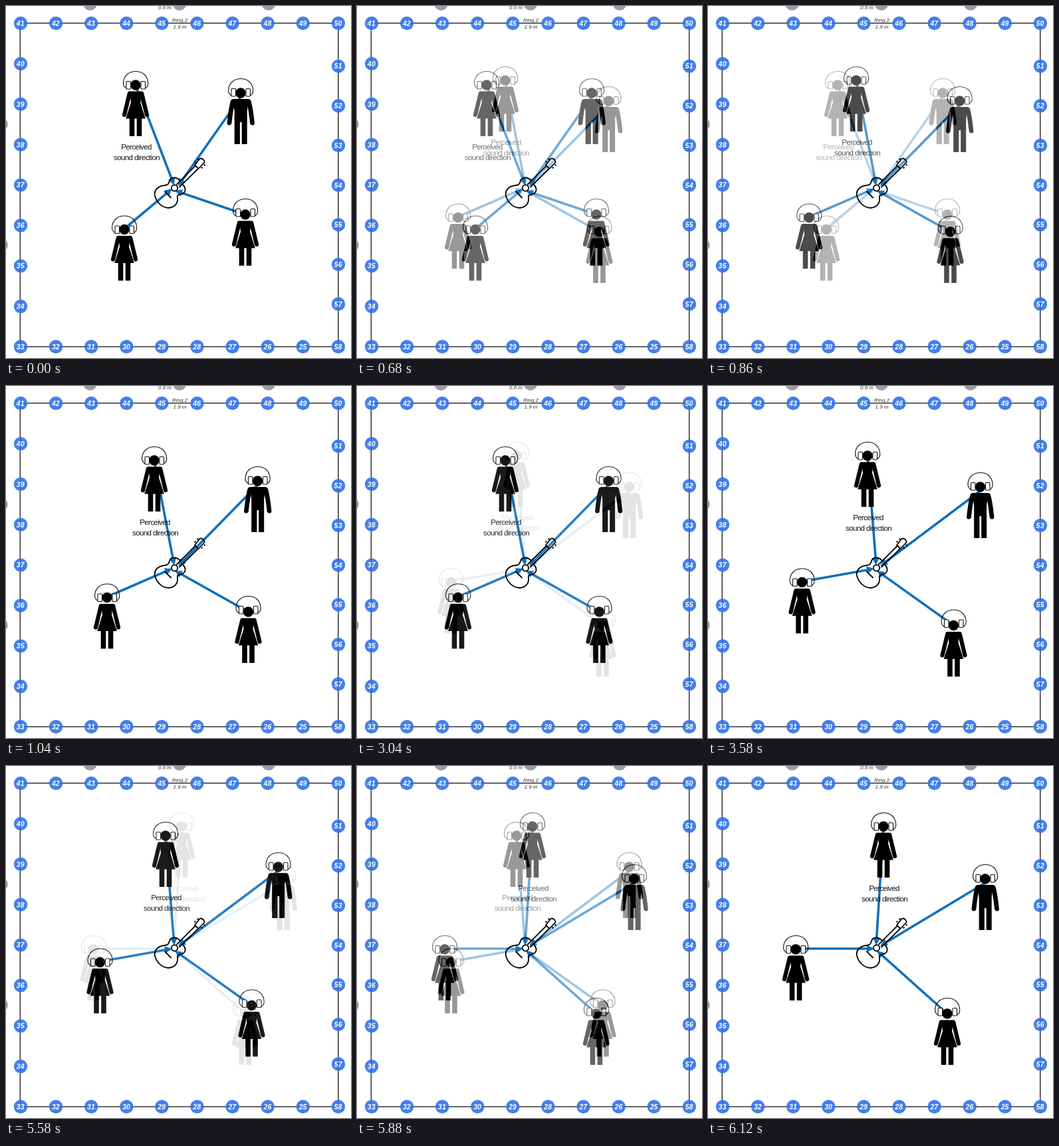
Animation, 519 px wide and 530 px high, one loop 8 s. Source, as an HTML page:

```html
<!DOCTYPE html>
<html lang="en">
<head>
<meta charset="utf-8">
<title>Perceived sound direction</title>
<style>
  html, body { margin: 0; width: 100%; height: 100%; overflow: hidden; background: #fff; }
  svg { display: block; width: 519px; height: 530px; }
  text { font-family: "Liberation Sans", Arial, sans-serif; text-anchor: middle; }
  .caption { font-size: 11.5px; letter-spacing: -.6px; fill: #111; }
  .number { font-size: 10.5px; font-style: italic; font-weight: bold; fill: #fff; }
  .ring { font-size: 8px; font-style: italic; fill: #333; }
  .arrow { stroke: #1070bc; stroke-width: 3.6; }
  .head { fill: #1070bc; }
  .guitar { fill: none; stroke: #000; stroke-width: 1.8; stroke-linejoin: round; stroke-linecap: round; }
</style>
</head>
<body>
<svg viewBox="0 0 519 530">
  <defs>
    <g id="phones" fill="none" stroke="#111" stroke-width="1.1">
      <path d="M-14 5Q-18.500 2-18.500-3C-18-15-9-20.500 .3-20.500S18-15 18.700-3Q19 2 14.500 5"/>
      <rect x="-14" y="-5.500" width="6.500" height="11.500" rx="1" fill="#fff"/>
      <rect x="8" y="-5.500" width="6.500" height="11.500" rx="1" fill="#fff"/>
    </g>
    <g id="woman">
      <circle r="7.700"/>
      <path d="M-9 9.500H9L7 26L14.800 50.500H-14.800L-7 26Z"/>
      <path d="M-9.200 12.700L-17 45M9.200 12.700L17 45" stroke="#000" stroke-width="6.200" stroke-linecap="round"/>
      <path d="M-9.300 50h7.600v27h-7.600zM1.700 50h7.600v27h-7.600z"/>
    </g>
    <g id="man">
      <circle r="7.700"/>
      <path d="M-12 9H12.500L9.700 27V77H1.700V44H-1.100V77H-9.300V27Z"/>
      <path d="M-11.700 12.700Q-14.500 22-17 45M12.200 12.700Q15 22 17.500 45" fill="none" stroke="#000" stroke-width="6.800" stroke-linecap="round"/>
    </g>
  </defs>
  <g id="scenes"></g>
  <g class="guitar">
    <path d="M262 263C258 258 252 257 248 260C244 264 247 269 239 270C229 271 222 277 224 286C227 297 236 304 245 304C254 303 259 297 258 289C257 284 260 284 265 283C271 280 271 274 266 269"/>
    <circle cx="253.500" cy="274" r="4.600" fill="#fff"/>
    <path d="M239 279.500L248 288.500M257 268.500L285 240.500M261 272.500L289.500 244.500M284 239.500L291.500 230Q294 228.500 297 231.500Q299.500 234.500 298 236L289.500 245Z"/>
    <path d="M284.500 234.500h.1M288.500 230.500h.1M294.500 243.500h.1M298.500 239.500h.1" stroke-width="2.400"/>
  </g>
  <g id="room"></g>
</svg>
<script>
// tail: where the arrow leaves, below the head centre; lift: how high the headphones sit.
const LISTENERS = [
  { shape: "woman", tail: 0, lift: 0, tip: [253, 270], spots: [[195, 119], [223, 112], [240, 105], [264, 91]] },
  { shape: "man",   tail: 6, lift: 1, tip: [259, 271], spots: [[353, 131], [378.5, 143], [409.5, 152], [417, 170]] },
  { shape: "woman", tail: -1, lift: 0, tip: [250, 275], spots: [[178, 336.5], [152, 318.5], [141.5, 295.5], [132, 276]] },
  { shape: "woman", tail: 0, lift: 3, tip: [254, 278], spots: [[360, 314], [364.5, 340], [369.5, 360.5], [360, 373]] }
];
const LOOP = 8000, FIRST_FADE = 500, FADE_GAP = 2540, STEP = 60, STEPS = 10;
const BLUE = "#3072e8", GREY = "#8e9299";

const label = (cls, x, y, str) => `<text class="${cls}" x="${x}" y="${y}">${str}</text>`;
const disc = (x, y, fill) => `<circle cx="${x}" cy="${y}" r="10.2" fill="${fill}" fill-opacity=".9"/>`;
const marker = (x, y, n) => disc(x, y, BLUE) + label("number", x - .3, y + 3.8, n);
const place = (id, x, y) => `<use href="#${id}" x="${x}" y="${y}"/>`;

function arrow(x, y, [tx, ty]) {
  const length = Math.hypot(tx - x, ty - y);
  const angle = Math.atan2(ty - y, tx - x) * 180 / Math.PI;
  return `<g transform="translate(${x} ${y}) rotate(${angle})">
    <path class="arrow" d="M0 0H${length - 8}"/>
    <path class="head" d="M${length} 0l-11-5.500v11z"/></g>`;
}

function scene(i) {
  let arrows = "", people = "";
  for (const { shape, tail, lift, tip, spots } of LISTENERS) {
    const [x, y] = spots[i];
    arrows += arrow(x, y + tail, tip);
    people += place(shape, x, y) + place("phones", x, y - lift);
  }
  const [cx, cy] = LISTENERS[0].spots[i];
  return `<g><rect width="519" height="530" fill="#fff"/>${arrows}${people}` +
    label("caption", cx + 1, cy + 97, "Perceived") +
    label("caption", cx + 1.5, cy + 113, "sound direction") + "</g>";
}

function room() {
  let out = '<path d="M21.3 25.800H499.800V513H21.300Z" fill="none" stroke="#333" stroke-width="1.5"/>';
  for (const x of [126.5, 261, 395]) out += disc(x, -3.5, GREY);
  for (const y of [178, 360]) out += disc(-7.5, y, GREY);
  for (let i = 0; i < 10; i++) {
    const x = 22 + i * 53.1;
    out += marker(x, 26, 41 + i) + marker(x, 513, i < 9 ? 33 - i : 58);
  }
  for (let i = 1; i < 8; i++) {
    out += marker(22, 26 + i * 60.9, 41 - i) + marker(500, 269.7 + (i - 4) * 59.7, 50 + i);
  }
  return out + label("ring", 239, 5, "0.6 m") +
    label("ring", 261.5, 24, "Ring 2") + label("ring", 261.5, 33.5, "1.9 m");
}

const scenes = document.getElementById("scenes");
scenes.innerHTML = [0, 1, 2, 3].map(scene).join("");
document.getElementById("room").innerHTML = room();

// Each scene fades in over the one below it, in even steps.
function render(time) {
  const t = time % LOOP;
  [...scenes.children].forEach((layer, i) => {
    if (!i) return;
    const start = FIRST_FADE + FADE_GAP * (i - 1);
    const step = Math.floor((t - start) / STEP) + 1;
    layer.setAttribute("opacity", Math.min(Math.max(step / STEPS, 0), 1));
  });
}

const origin = performance.now();
function tick() {
  render(performance.now() - origin);
  requestAnimationFrame(tick);
}
render(0);
requestAnimationFrame(tick);
</script>
</body>
</html>
```
